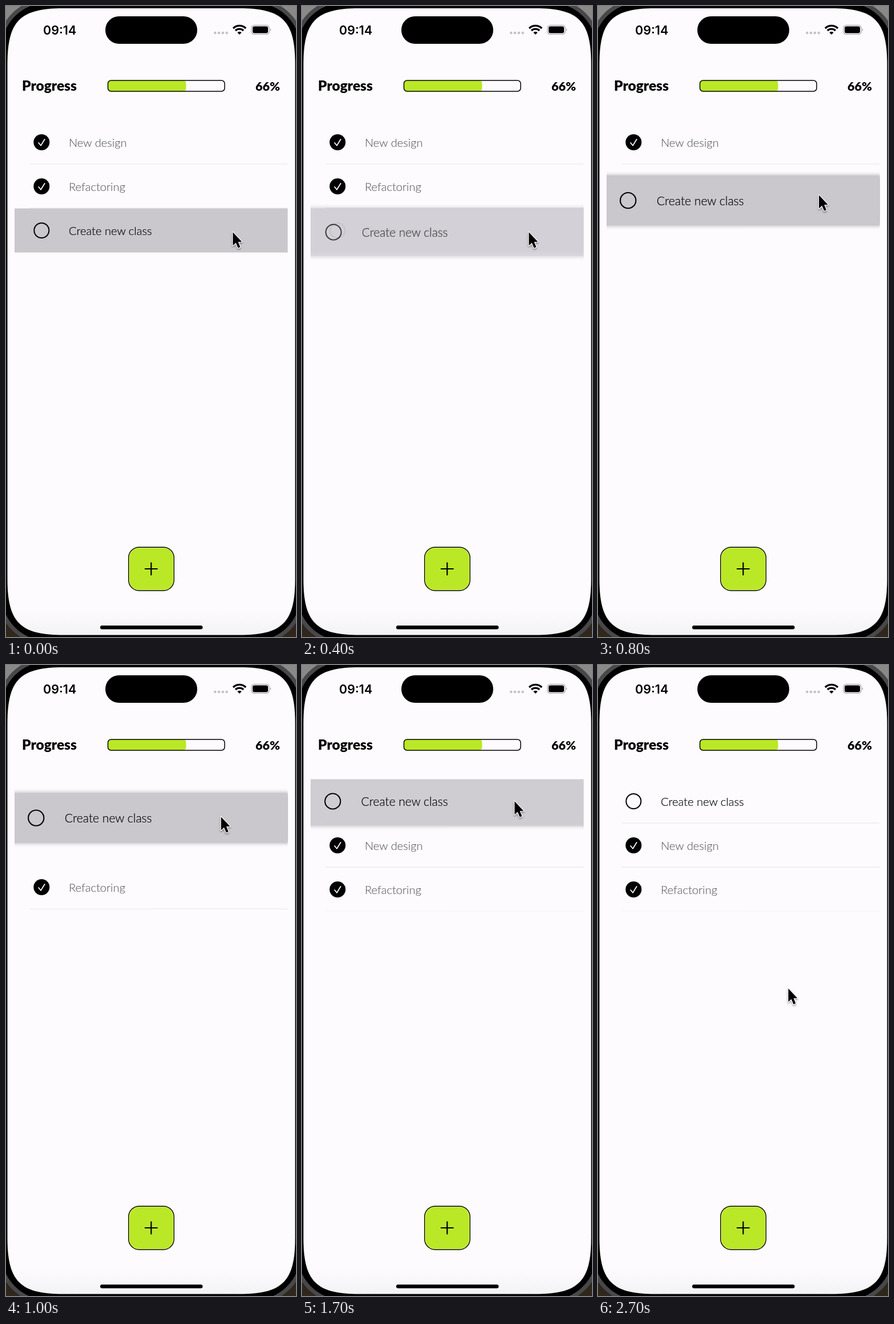
An HTML page for the animation above (3000 ms loop, 508x1102 px).

```html
<!DOCTYPE html>
<html lang="en">
<head>
<meta charset="utf-8">
<title>Reorder tasks</title>
<style>
  html, body { margin: 0; width: 100%; height: 100%; overflow: hidden; background: #000; }
  svg { display: block; width: 508px; height: 1102px; }
  .item { font: 300 20.1px Lato, "Open Sans", sans-serif; stroke: #000; stroke-width: .2; }
  .done text { fill: #666568; stroke: #666568; }
  .bold { font: 900 24.5px Lato, "Open Sans", sans-serif; }
  .percent { font-size: 21.5px; }
  .clock { font: 600 21.5px Inter, Roboto, sans-serif; }
  .sep { stroke: #e7e5e8; stroke-width: 1.2; }
  .line { fill: none; stroke-linecap: round; stroke-linejoin: round; }
</style>
</head>
<body>
<svg viewBox="0 0 508 1102">
  <defs>
    <linearGradient id="desk" x2="0" y2="1">
      <stop offset=".5" stop-color="#8b8988"/>
      <stop offset=".5" stop-color="#2f271c"/>
    </linearGradient>
    <linearGradient id="paper" x2="0" y2="1">
      <stop offset=".96" stop-color="#fdfbfe"/>
      <stop offset="1" stop-color="#f3f2f4"/>
    </linearGradient>
    <clipPath id="list"><rect x="15" y="199.5" width="478.5" height="730"/></clipPath>
    <filter id="soft" x="-10%" y="-40%" width="120%" height="180%"><feGaussianBlur stdDeviation="4"/></filter>
    <filter id="drop" x="-60%" y="-40%" width="240%" height="200%">
      <feDropShadow dx="0" dy="2" stdDeviation="1.6" flood-opacity=".4"/>
    </filter>
    <g id="check">
      <circle cx="62.3" r="14"/>
      <path class="line" d="M57 .8l4 5 6.8-11" stroke="#fff" stroke-width="1.7"/>
    </g>
    <g id="task">
      <circle cx="62.3" r="13" fill="none" stroke="#000" stroke-width="2"/>
      <text class="item" x="110" y="7.5">Create new class</text>
    </g>
  </defs>

  <!-- phone body -->
  <rect width="508" height="1102" fill="url(#desk)"/>
  <rect x="-15" y="-13" width="538" height="1129" rx="88" fill="#48474a"/>
  <rect x="-8" y="-6" width="524" height="1115" rx="81"/>
  <path id="screen" fill="url(#paper)"/>

  <!-- status bar -->
  <rect x="174" y="18" width="161" height="48" rx="24"/>
  <text class="clock" x="65" y="49.5">09:14</text>
  <path class="line" d="M366.2 47h.01m6.800 0h.01m6.800 0h.01m6.800 0h.01" stroke="#c4c2c5" stroke-width="4.6"/>
  <g fill="none" stroke="#000" stroke-width="3.3">
    <path d="M398 39a15.5 15.5 0 0 1 22 0"/>
    <path d="M402 43a10 10 0 0 1 14 0"/>
  </g>
  <path d="M409 50l-3.700-3.700a5.200 5.200 0 0 1 7.400 0z"/>
  <rect x="430" y="33.5" width="31" height="16" rx="5" fill="none" stroke="#a3a1a4" stroke-width="1.2"/>
  <rect x="432" y="35.5" width="27" height="12" rx="3.3"/>
  <path d="M462.8 39q3 2.500 0 5z" fill="#a3a1a4"/>

  <!-- progress -->
  <text class="bold" x="28" y="147.5">Progress</text>
  <text class="bold percent" x="480" y="147.5" text-anchor="end">66%</text>
  <rect x="178.5" y="130" width="137" height="19" rx="5" fill="#bae827"/>
  <rect x="178.5" y="130" width="204.5" height="19" rx="5.5" fill="none" stroke="#000" stroke-width="1.5"/>

  <!-- list -->
  <g clip-path="url(#list)">
    <path id="topSep" class="sep" d="M41 276H494"/>
    <g id="rowA" class="done">
      <use href="#check"/>
      <text class="item" x="110" y="7.5">New design</text>
      <path class="sep" d="M41 38H494"/>
    </g>
    <g id="rowB" class="done">
      <use href="#check"/>
      <text class="item" x="110" y="7.5">Refactoring</text>
      <path id="lastSep" class="sep" d="M41 38H494"/>
    </g>
    <g id="rest" transform="translate(0 392)">
      <rect x="15" y="-38.5" width="479" height="77" fill="#cac7cd"/>
      <use href="#task"/>
    </g>
    <g id="held">
      <g id="plate">
        <rect id="shade" width="508" filter="url(#soft)"/>
        <rect id="fill" width="508" fill="#cac7cd"/>
      </g>
      <use id="lifted" href="#task"/>
    </g>
  </g>

  <!-- add button and home bar -->
  <rect x="214.7" y="945.2" width="79.6" height="75.8" rx="18.5" fill="#bae827" stroke="#000" stroke-width="1.4"/>
  <rect x="216" y="946.5" width="77" height="73.2" rx="17.2" fill="none" stroke="#e6f5a8" stroke-opacity=".5"/>
  <path class="line" d="M243.8 983h21M254.3 972.5v21" stroke="#000" stroke-width="2.2"/>
  <rect x="165" y="1082" width="179.5" height="6.5" rx="3.25"/>

  <g id="cursor" filter="url(#drop)">
    <path transform="translate(.4 1) scale(1.08)" d="M0 0V21.500L4.900 17.200 8.400 25.500 12 24 8.500 15.800 14.600 15.400Z" stroke="#fff" stroke-width="2.2" stroke-linejoin="round" paint-order="stroke"/>
  </g>
</svg>
<script>
const LOOP = 3000, STEP = 100, ROW = 77, TOP = 238;
const el = id => document.getElementById(id);
const set = (id, attrs) => Object.entries(attrs).forEach(([k, v]) => el(id).setAttribute(k, v));
const move = (id, x, y) => set(id, { transform: `translate(${x} ${y})` });
const mix = (a, b, k) => a + (b - a) * k;

// Smoothstep from 0 to 1 between two times.
function ease(t, from, to) {
  const u = Math.min(1, Math.max(0, (t - from) / (to - from)));
  return u * u * (3 - 2 * u);
}

// Screen outline with continuous corners.
function screenPath(l, t, r, b, reach = 98, pull = 22) {
  const corner = (x, y, ax, ay, bx, by) =>
    `${x + ax * reach} ${y + ay * reach}C${x + ax * pull} ${y + ay * pull} ${x + bx * pull} ${y + by * pull} ${x + bx * reach} ${y + by * reach}`;
  return 'M' + [corner(l, t, 0, 1, 1, 0), corner(r, t, -1, 0, 0, 1),
    corner(r, b, 0, -1, -1, 0), corner(l, b, 1, 0, 0, -1)].join('L') + 'Z';
}

function draw(t) {
  const rise = ease(t, 200, 500);
  const fall = ease(t, 1620, 2000);
  const drag = ease(t, 500, 1180);
  const follow = ease(t, 550, 1170);
  const leave = ease(t, 2300, 2700);
  const shiftA = ease(t, 930, 1280);
  const shiftB = ease(t, 750, 1040);

  const lift = rise * (1 - fall);
  const height = ROW + 8 * lift;
  const band = { y: -height / 2, height };

  move('rowA', 0, TOP + ROW * shiftA);
  move('rowB', 0, TOP + ROW * (1 + shiftB));
  move('held', 0, mix(TOP + 2 * ROW + 4 * rise, TOP, follow));
  move('cursor', mix(mix(397, 372, drag), 333, leave), mix(mix(394, 237, drag), 564, leave));

  set('topSep', { opacity: fall > 0 ? 1 : 0 });
  set('lastSep', { opacity: mix(1, .4, shiftA) });
  set('rest', { opacity: 1 - rise });
  set('held', { opacity: rise });
  set('plate', { opacity: 1 - fall });
  set('shade', { ...band, opacity: .42 * lift });
  set('fill', band);
  set('lifted', { transform: `translate(254 0) scale(${1 + .05 * lift}) translate(-254 0)` });
}

set('screen', { d: screenPath(2.5, 4, 506.5, 1098.5) });
const start = performance.now();
function tick() {
  const t = (performance.now() - start) % LOOP;
  draw(Math.floor(t / STEP) * STEP);
  requestAnimationFrame(tick);
}
tick();
</script>
</body>
</html>
```
